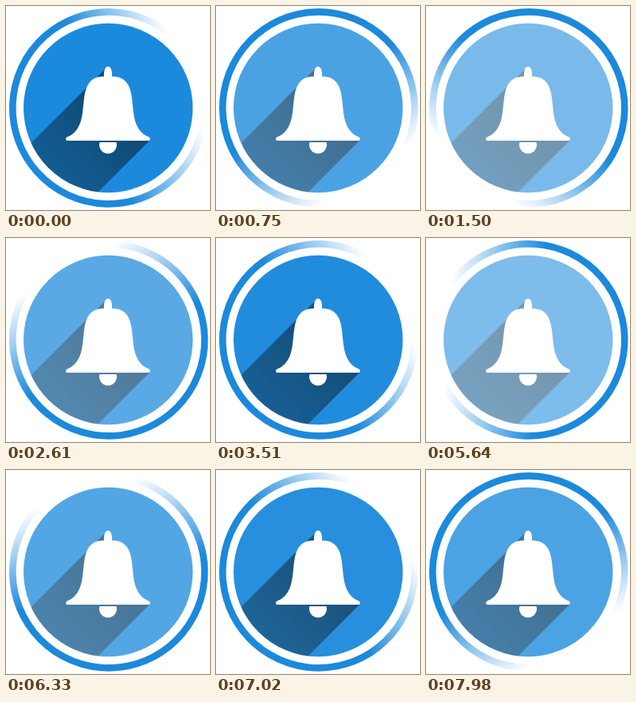
Write an HTML page that moves like this. It is 256 by 256 pixels and loops after 8000 ms.

```html
<!DOCTYPE html>
<html lang="en">
<head>
<meta charset="utf-8">
<title>Notification bell</title>
<style>
  html, body { margin: 0; width: 100%; height: 100%; overflow: hidden; background: #fff; }
  svg { display: block; width: 100vw; height: 100vh; }
</style>
</head>
<body>
<svg viewBox="0 0 256 256">
  <defs>
    <linearGradient id="fade" gradientUnits="userSpaceOnUse" x1="115" y1="0" x2="231" y2="0">
      <stop offset="0" stop-color="#1b89dc"/>
      <stop offset="1" stop-color="#1b89dc" stop-opacity="0"/>
    </linearGradient>
    <linearGradient id="shade" gradientUnits="userSpaceOnUse" x1="150" y1="130" x2="70" y2="210">
      <stop offset="0" stop-opacity=".48"/>
      <stop offset="1" stop-opacity=".34"/>
    </linearGradient>
    <clipPath id="round"><circle cx="128.2" cy="128" r="106.2"/></clipPath>
  </defs>

  <circle id="ring" cx="128.8" cy="127.9" r="120.5" fill="none" stroke="url(#fade)" stroke-width="8.6"/>

  <g id="disc">
    <circle cx="128.2" cy="128" r="106.2" fill="#1c8adc"/>
    <path clip-path="url(#round)" fill="url(#shade)"
      d="M125 78.5L0 203.5V256H93L181 168H150V120L128 80Z"/>
  </g>

  <g fill="#fff">
    <path d="M77 169C74.5 169 74.5 165.5 77 164.3C88 160 94 150 96 134
      C98 118 98 105 104 97C108 91 114 88.500 123 88.500C122.500 82 124 76 128 76
      C132 76 133.500 82 133 88.500C142 88.500 148 91 152 97C158 105 158 118 160 134
      C162 150 168 160 179 164.3C181.500 165.5 181.500 169 179 169Z"/>
    <path d="M117.500 171H138.500A11 11 0 1 1 117.500 171Z"/>
  </g>
</svg>
<script>
  const LOOP = 8000, STEP = 30, TURN = 3600, START_ANGLE = -20, MIN_OPACITY = 0.5;
  const ring = document.getElementById('ring');
  const disc = document.getElementById('disc');

  function draw(now) {
    const time = Math.floor((now % LOOP) / STEP) * STEP;
    const phase = (time % TURN) / TURN;
    const wave = Math.abs(1 - 2 * phase);
    ring.setAttribute('transform', `rotate(${START_ANGLE + 360 * phase} 128.8 127.9)`);
    disc.setAttribute('opacity', MIN_OPACITY + (1 - MIN_OPACITY) * wave);
  }

  const begin = performance.now();
  function tick() {
    draw(performance.now() - begin);
    requestAnimationFrame(tick);
  }
  tick();
</script>
</body>
</html>
```
